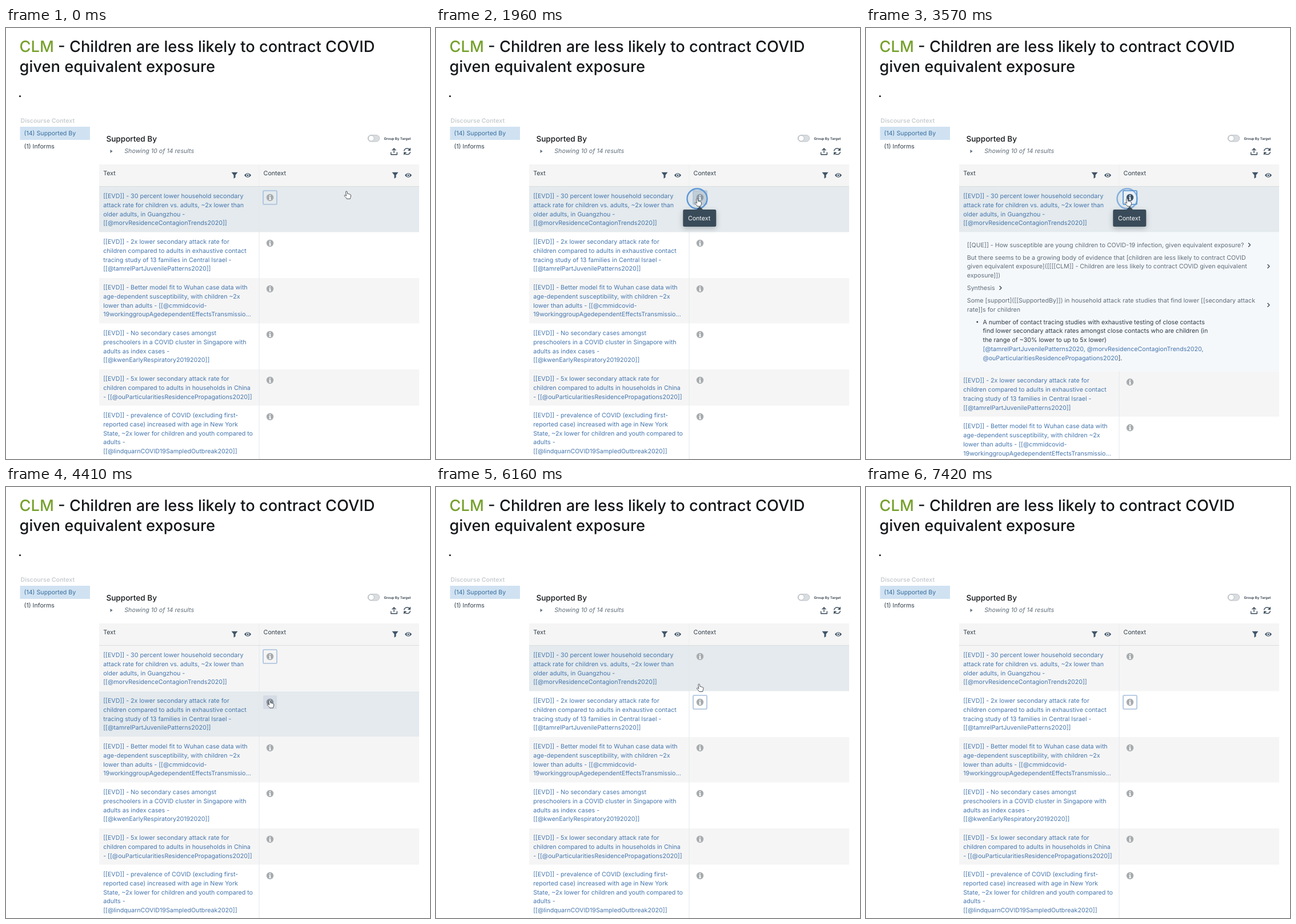
Recreate the animation shown at these times as an HTML page. Size 742 by 755 pixels, loop 7.49 s.

```html
<!DOCTYPE html>
<html lang="en">
<head>
<meta charset="utf-8">
<title>Discourse context</title>
<style>
html, body { margin: 0; width: 100%; height: 100%; overflow: hidden; background: #fff; }
svg { display: block; width: 742px; height: 755px; }
text {
  font: 10.67px Inter, sans-serif; font-optical-sizing: none;
  text-rendering: geometricPrecision; fill: #2f3c47; white-space: pre;
}
.title { font-size: 27.25px; font-weight: 500; fill: #15181b; }
.link { fill: #4576ad; }
.muted { fill: #5f6d79; }
.line { fill: none; stroke: #394b59; stroke-width: 1.4; stroke-linecap: round; stroke-linejoin: round; }
.tip text { fill: #fff; }
.tip { filter: drop-shadow(0 3px 5px rgba(16, 22, 26, .25)); }
</style>
</head>
<body>
<svg id="stage" viewBox="0 0 742 755"></svg>
<script>
const LOOP = 7490, TOP = 278, PANEL = 243.3, STEP = 15.85, RING = 350;
const KEYS = {
  home: 'morvResidenceContagionTrends2020',
  part: 'tamrelPartJuvenilePatterns2020',
  early: 'kwenEarlyRespiratory20192020',
  traits: 'ouParticularitiesResidencePropagations2020',
  tests: 'lindquarnCOVID19SampledOutbreak2020'
};
const ROWS = [
  ['[[EVD]] - 30 percent lower household secondary', 'attack rate for children vs. adults, ~2x lower than',
    'older adults, in Guangzhou -', `[[@${KEYS.home}]]`],
  ['[[EVD]] - 2x lower secondary attack rate for', 'children compared to adults in exhaustive contact',
    'tracing study of 13 families in Central Israel -', `[[@${KEYS.part}]]`],
  ['[[EVD]] - Better model fit to Wuhan case data with', 'age-dependent susceptibility, with children ~2x',
    'lower than adults - [[@cmmidcovid-', '19workinggroupAgedependentEffectsTransmissio...'],
  ['[[EVD]] - No secondary cases amongst', 'preschoolers in a COVID cluster in Singapore with',
    'adults as index cases -', `[[@${KEYS.early}]]`],
  ['[[EVD]] - 5x lower secondary attack rate for', 'children compared to adults in households in China',
    `- [[@${KEYS.traits}]]`],
  ['[[EVD]] - prevalence of COVID (excluding first-', 'reported case) increased with age in New York',
    'State, ~2x lower for children and youth compared to', 'adults -', `[[@${KEYS.tests}]]`]
];

// Pointer path: time, x, y of the hot spot
const PATH = [
  [0, 596, 286], [350, 596, 286], [1350, 457, 299], [3680, 457, 299],
  [4300, 461, 373], [4700, 462, 377], [6050, 462, 377], [6480, 452, 185],
  [6620, 452, 185], [7000, 458, -24], [LOOP, 458, -24]
];
const CLICKS = [1890, 3400, 4640, 5780];
const OPEN = [[0, 2030, 3640], [1, 4760, 5950]];
const TIPS = [[1480, 3720], [4520, 6080]];

const text = (x, y, s, cls = '', extra = '') => `<text x="${x}" y="${y}" class="${cls}" ${extra}>${s}</text>`;
const lines = (x, y, list, cls) => list.map((s, i) => text(x, y + i * STEP, s, cls)).join('');
const rect = (x, y, w, h, fill, extra = '') =>
  `<rect x="${x}" y="${y}" width="${w}" height="${h}" fill="${fill}" ${extra}/>`;
const path = (d, extra = 'class="line"') => `<path d="${d}" ${extra}/>`;
const chevron = (x, y) => path(`M${x - 1.5} ${y - 3}l3 3l-3 3`);

const columnIcons = x => path(`M${x - 5.5} 252.7h11l-4 5v4l-3 2v-6z`, 'fill="#3f5468"') +
  path(`M${x + 17} 258q6-7.5 12 0q-6 7.5-12 0z`, 'fill="#3f5468"') +
  `<circle cx="${x + 23}" cy="258" r="2.8" fill="#f5f5f5"/><circle cx="${x + 23}" cy="258" r="1.5" fill="#3f5468"/>`;

function header() {
  return text(23.6, 42, '<tspan fill="#76a12c">CLM</tspan> - Children are less likely to contract COVID', 'title') +
    text(23.6, 77, 'given equivalent exposure', 'title') +
    '<circle cx="24.5" cy="119.5" r="1.6" fill="#15181b"/>' +
    text(25.5, 166, 'Discourse Context', '', 'style="font-size:10.6px;font-weight:600;fill:#c8cdd1"') +
    rect(24.5, 173, 122.5, 23, '#d0e2f2') +
    text(31.5, 188.2, '(14) Supported By', '', 'style="fill:#3a6f9f"') + text(31.5, 211, '(1) Informs') +
    text(175.4, 199.2, 'Supported By', '', 'style="font-size:13.6px;font-weight:500;fill:#15181b"') +
    path('M182.5 213l4 3l-4 3z', 'fill="#5c7080"') +
    text(207.3, 219.3, 'Showing 10 of 14 results', 'muted', 'style="font-style:italic"') +
    rect(633.2, 187.5, 20.5, 11.5, '#d9dde0', 'rx="5.75" stroke="#b4babf" stroke-width=".8"') +
    '<circle cx="639.2" cy="193.2" r="5" fill="#fff" stroke="#a9b0b6" stroke-width=".8"/>' +
    text(661.5, 195.6, 'Group By Target', '', 'style="font-size:6px;font-weight:600"') +
    path('M679 218.5v-7.5m-3 3l3-3l3 3M673.7 218v3.8h10.6v-3.8') +
    path('M696.7 215a5.4 5.4 0 0 1 10-1.2m.6-3v3.4h-3.4M707.3 217.5a5.4 5.4 0 0 1-10 1.2m-.6 3v-3.4h3.4') +
    rect(163, 239, 560, 38.5, '#f5f5f5') + rect(163, 277, 560, 1, '#d9dcde') + rect(442.5, 239, 1, 38, '#ebedee') +
    text(170.3, 258.2, 'Text') + text(450.6, 258.2, 'Context') + columnIcons(400) + columnIcons(681);
}

function rowMarkup(list, i) {
  const h = 16 * Math.max(list.length, 3) + 16;
  return `<g id="row${i}">` + rect(163, 0, 560, h - .5, '#fff', `id="bg${i}"`) + rect(442.5, 0, 1, h, '#e4e7e9') +
    lines(170.2, 19.9, list, 'link') +
    rect(450, 7, 24, 24, 'none', `id="btn${i}" rx="1.5" stroke-width="1.6"`) +
    `<circle id="dot${i}" cx="462" cy="19" r="6.2"/>` +
    path('M461 14.8h2v1.8h-2zM460.3 17.8h2.8v4.2h.8v1.2h-3.6v-1.2h.8v-3h-.8z', 'fill="#fff"') + '</g>';
}

function panelMarkup() {
  return '<g id="panel">' + rect(163, 0, 560, PANEL, '#f5f8fb') +
    text(176.8, 25.5, '[[QUE]] - How susceptible are young children to COVID-19 infection, given equivalent exposure?', 'muted') +
    chevron(671, 22) +
    lines(176.8, 47.6, ['But there seems to be a growing body of evidence that [children are less likely to contract COVID',
      'given equivalent exposure]([[[[CLM]] - Children are less likely to contract COVID given equivalent',
      'exposure]])'], 'muted') + chevron(704.5, 59.5) +
    text(176.8, 101.3, 'Synthesis', 'muted') + chevron(235.5, 97.3) +
    lines(176.8, 123.1, ['Some [support]([[SupportedBy]]) in household attack rate studies that find lower [[secondary attack',
      'rate]]s for children'], 'muted') + chevron(704.5, 127.3) +
    '<circle cx="194.8" cy="157" r="1.4" fill="#293742"/>' +
    lines(204.4, 160.6, ['A number of contact tracing studies with exhaustive testing of close contacts',
      'find lower secondary attack rates amongst close contacts who are children (in',
      'the range of ~30% lower to up to 5x lower)',
      `<tspan class="link">[@${KEYS.part}, @${KEYS.home},</tspan>`,
      `<tspan class="link">@${KEYS.traits}</tspan>].`]) + '</g>';
}

const tip = (id, x, y, arrow) => `<g id="${id}" class="tip">` + rect(x, y, 58, 30, '#394b59', 'rx="2.5"') +
  path(arrow, 'fill="#394b59"') + text(x + 8.6, y + 19, 'Context') + '</g>';

const stage = document.getElementById('stage');
stage.innerHTML = header() + ROWS.map(rowMarkup).join('') + panelMarkup() +
  '<circle id="ring" r="17.5" fill="#6ea3dc" fill-opacity=".06" stroke="#5c96d6" stroke-width="2.4"/>' +
  tip('tip0', 432.3, 318, 'M455 319l6.5-6.5l6.5 6.5z') + tip('tip1', 383.5, 362, 'M441 370.5l7 6.5l-7 6.5z') +
  path('M-1.5 1.2C-1.5-.6 1-.6 1.2 1.2L2 5.2C3.2 4.4 4 4.8 4.4 5.6C5.4 5 6.2 5.4 6.5 6.3C7.6 6 8.2 6.6 8.2 7.8' +
    'C8.3 11 7 12 6.8 14.4H.4C-.4 12.4-2.6 11-4 9C-4.8 7.6-3.2 6.6-2 7.6L-.6 9z',
    'id="hand" fill="#fff" stroke="#3a4046" stroke-width="1" stroke-linejoin="round"') +
  path('M0 0V11.2L2.6 8.8L4.3 12.8L6.2 12L4.5 8.1H8z', 'id="arrow" fill="#111" stroke="#fff" stroke-width=".8"');

const el = id => document.getElementById(id);
const set = (id, attrs) => Object.entries(attrs).forEach(([k, v]) => el(id).setAttribute(k, v));
const clamp = v => Math.min(1, Math.max(0, v));
const move = (x, y) => `translate(${x} ${y})`;

function pointer(t) {
  const n = PATH.findIndex(p => p[0] > t), a = PATH[n - 1], b = PATH[n];
  const k = (t - a[0]) / (b[0] - a[0]), e = k * k * (3 - 2 * k);
  return [a[1] + (b[1] - a[1]) * e, a[2] + (b[2] - a[2]) * e];
}

function buttonLook(i, { open, focus, over, pressed }) {
  if (over && pressed) return ['#c6cfd7', '#b4c4d4', '#8f9aa3'];
  if (open === i) return ['#eef3f7', '#468bce', '#3e5264'];
  if (over) return ['#d6dce5', focus === i ? '#a5bfdc' : 'none', '#858f99'];
  return ['none', focus === i ? '#a5bfdc' : 'none', '#a8acaf'];
}

function render(t) {
  const [x, y] = pointer(t);
  const shown = OPEN.find(o => t >= o[1] && t < o[2]);
  const open = shown ? shown[0] : -1;
  const focus = t < CLICKS[2] ? 0 : 1;
  const hover = y < TOP ? -1 : Math.floor((y - TOP) / 80);
  const click = CLICKS.find(c => t >= c && t < c + RING);
  const pressed = click !== undefined && t < click + 130;

  let top = TOP;
  ROWS.forEach((list, i) => {
    const after = open >= 0 && i > open;
    const over = hover === i && Math.abs(x - 462) < 13 && Math.abs(y - top - 19) < 13;
    const [fill, stroke, dot] = buttonLook(i, { open, focus, over, pressed });
    set('row' + i, { transform: move(0, top) });
    set('bg' + i, { fill: hover === i ? '#e4eaed' : (i + after) % 2 ? '#fff' : '#f5f5f5' });
    set('btn' + i, { fill, stroke });
    set('dot' + i, { fill: dot });
    top += 16 * Math.max(list.length, 3) + 16;
    if (i === open) {
      set('panel', { transform: move(0, top) });
      top += PANEL;
    }
  });
  set('panel', { visibility: shown ? 'visible' : 'hidden' });
  set('ring', { cx: x, cy: y, opacity: click === undefined ? 0 : clamp((click + RING - t) / 250) });
  TIPS.forEach(([a, b], i) => set('tip' + i, { opacity: Math.min(clamp((t - a) / 100), clamp((b - t) / 100)) }));
  const hand = y >= TOP;
  set('hand', { transform: move(x, y) + ' scale(.92)', visibility: hand ? 'visible' : 'hidden' });
  set('arrow', { transform: move(x, y), visibility: hand ? 'hidden' : 'visible' });
}

const start = performance.now();
function tick() {
  render((performance.now() - start) % LOOP);
  requestAnimationFrame(tick);
}
tick();
</script>
</body>
</html>
```
